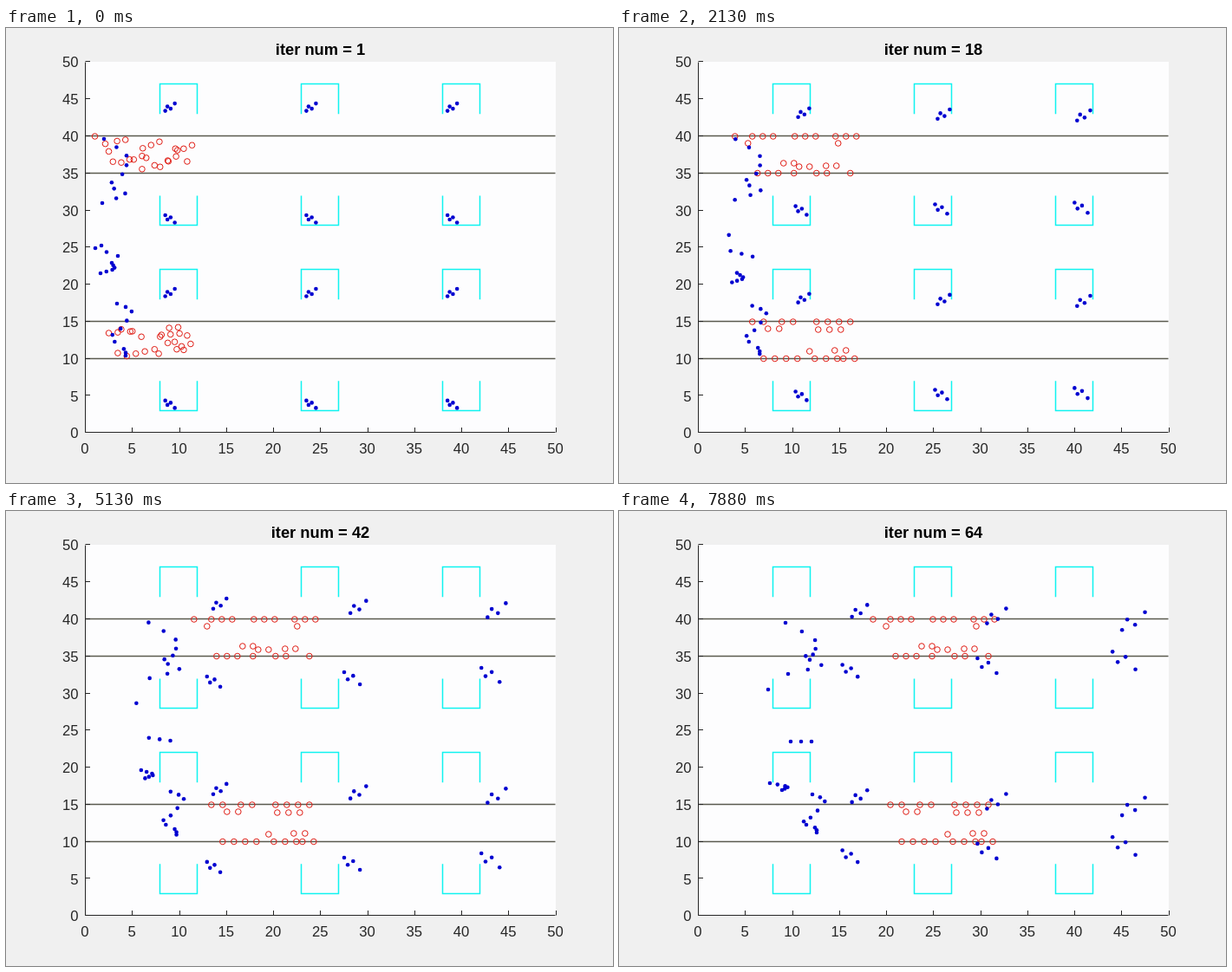
These frames come from a looping animation (700 px wide and 525 px high, 8000 ms). An HTML page:

```html
<!DOCTYPE html>
<html>
<head>
<meta charset="utf-8">
<title>Crowd simulation</title>
<style>
  html, body { margin: 0; width: 100%; height: 100%; overflow: hidden; background: #f0f0f0; }
  svg { display: block; width: 700px; height: 525px; font-family: "Liberation Sans", Arial, sans-serif; }
  .label { font-size: 16.67px; fill: #262626; }
  .title { font-size: 18.33px; font-weight: bold; }
  .axis { stroke: #262626; fill: none; }
  .wall { stroke: #5a5a4e; stroke-width: 1.4; }
  .room { stroke: #0ff3f0; stroke-width: 1.5; fill: none; }
  .runner { stroke: #e01c14; fill: none; }
  .walker { fill: #0000d0; }
</style>
</head>
<body>
<svg id="stage" viewBox="0 0 700 525"></svg>
<script>
const LOOP = 8000, STEP = 125, STEPS = 64;
const RUN_SPEED = 3.462, SETTLE = 13;
const ROOM_ROWS = [{ closed: 47, open: 43 }, { closed: 28, open: 32 }, { closed: 22, open: 18 }, { closed: 3, open: 7 }];
const ROOM_COLUMNS = [8, 23, 38];
const FORMATION = [[-1, 0.8], [-0.5, -0.2], [0.25, 0.3], [1.2, -0.9]];

const stage = document.getElementById("stage");
const movers = [];

const px = x => 91 + x * 10.85;
const py = y => 467.25 - y * 8.5575;
const snap = v => Math.floor(v - 0.25) + 0.5;
const mix = (a, b, t) => a + (b - a) * t;
const mixPoint = (p, q, t) => [mix(p[0], q[0], t), mix(p[1], q[1], t)];

let seed = 7;
function random() {
  seed = (seed * 16807) % 2147483647;
  return seed / 2147483647;
}

function add(tag, attrs, text = "") {
  const node = document.createElementNS("http://www.w3.org/2000/svg", tag);
  for (const name in attrs) node.setAttribute(name, attrs[name]);
  node.textContent = text;
  return stage.appendChild(node);
}

function drawPlot() {
  add("rect", { x: 91, y: 39, width: 543, height: 428, fill: "#fdfdfe" });
  for (const y of [10, 15, 35, 40])
    add("path", { class: "wall", d: `M91 ${snap(py(y))}H633.5` });
  for (const { closed, open } of ROOM_ROWS)
    for (const x of ROOM_COLUMNS)
      add("path", { class: "room", d: `M${snap(px(x))} ${py(open)}V${snap(py(closed))}H${snap(px(x + 4))}V${py(open)}` });
  add("path", { class: "axis", d: "M91.5 39.5V466.5H633.5" });
  for (let v = 0; v <= 50; v += 5) {
    const x = Math.round(px(v)) + 0.5, y = Math.round(py(v)) - 0.5;
    add("path", { class: "axis", d: `M${x} 466.5v-5.5M91.5 ${y}h5.5` });
    add("text", { class: "label", x: px(v), y: 491, "text-anchor": "middle" }, v);
    add("text", { class: "label", x: 83.5, y: py(v) + 6.1, "text-anchor": "end" }, v);
  }
}

function addWalker(from, to) {
  movers.push({
    node: add("circle", { class: "walker", r: 2.3 }),
    at: n => mixPoint(from, to, (n - 1) / (STEPS - 1))
  });
}

// Four walkers leave each room through its open side and spread out.
function addRoomGroup(row, column) {
  const up = row.open > row.closed;
  const slant = up ? -1 : 1;
  const x = px(ROOM_COLUMNS[column] + 1);
  const y = py(Math.min(row.open, row.closed) + 0.9);
  const dx = 88 - 5 * column - (up ? 11 : 0);
  const dy = up ? -36 - 6 * column : 24 + 6 * column;
  const spread = 8 + 2 * column;
  for (const [u, v] of FORMATION)
    addWalker([x + u * 5, y + v * slant * 5],
              [x + dx + u * spread, y + dy + v * slant * spread]);
}

function pointOn(line, t) {
  const place = t * (line.length - 1);
  const i = Math.min(Math.floor(place), line.length - 2);
  return line.length === 1 ? line[0] : mixPoint(line[i], line[i + 1], place - i);
}

// Walkers spaced along one line move to the matching places on another.
function addTrail(count, from, to) {
  for (let i = 0; i < count; i++) {
    const t = count > 1 ? i / (count - 1) : 0;
    addWalker(pointOn(from, t), pointOn(to, t));
  }
}

// Runs of evenly spaced runners, given where they end; they start loosely
// scattered, get pushed apart and then drift at one speed.
function addRunners(middle, gap, runs) {
  const travel = RUN_SPEED * (STEPS - 1);
  const front = 213;
  for (const [x, y, count] of runs)
    for (let i = 0; i < count; i++) {
      const start = x + i * gap - travel;
      const lead = (front - start) * 0.2;
      const inward = (middle - y) * random() * 0.9;
      movers.push({
        node: add("circle", { class: "runner", r: 3.3 }),
        at(n) {
          const loose = Math.max(0, 1 - (n - 1) / (SETTLE - 1)) ** 2;
          return [start + RUN_SPEED * (n - 1) + lead * loose, y + inward * loose];
        }
      });
    }
}

drawPlot();

addRunners(146, 12, [
  [293, 125, 1], [313, 125, 3], [362, 125, 3], [409, 125, 3],
  [319, 167.5, 3], [361, 167.5, 1], [387, 167.5, 2], [426, 167.5, 1],
  [308, 133, 1], [412, 133, 1], [349, 156, 2], [367, 160, 2], [398, 159, 2]
]);
addRunners(360, 13, [
  [313, 339, 2], [347, 339, 2], [387, 339, 4],
  [326, 381.5, 4], [385, 381.5, 3], [418, 381.5, 2],
  [331, 347, 2], [389, 348, 3], [379, 373, 1], [408, 372, 2]
]);

for (const row of ROOM_ROWS)
  ROOM_COLUMNS.forEach((_, column) => addRoomGroup(row, column));

// Crowd at the left edge
addTrail(10,
  [[113, 128], [139, 145], [139, 165], [117, 182], [140, 192], [111, 202]],
  [[192, 129], [226, 147], [227, 165], [212, 168], [236, 179], [195, 188]]);
addTrail(1, [[110, 251]], [[172, 206]]);
addTrail(3, [[103, 254], [129, 263]], [[198, 266], [222, 266]]);
addTrail(6, [[122, 271], [126, 278], [109, 283]], [[174, 314], [196, 318], [188, 322]]);
addTrail(10,
  [[128, 318], [146, 325], [136, 344], [119, 357], [138, 372], [138, 378]],
  [[223, 327], [239, 333], [224, 352], [210, 360], [228, 366], [228, 371]]);

const title = add("text", { class: "title", x: 362.5, y: 31, "text-anchor": "middle" });
let shown = 0;

function render(time) {
  const tick = Math.floor((time % LOOP) / 10) * 10;
  const n = 1 + Math.floor(tick / STEP);
  if (n === shown) return;
  shown = n;
  title.textContent = `iter num = ${n}`;
  for (const { node, at } of movers) {
    const [x, y] = at(n);
    node.setAttribute("cx", x.toFixed(2));
    node.setAttribute("cy", y.toFixed(2));
  }
}

const begin = performance.now();
function loop() {
  render(performance.now() - begin);
  requestAnimationFrame(loop);
}
loop();
</script>
</body>
</html>
```
